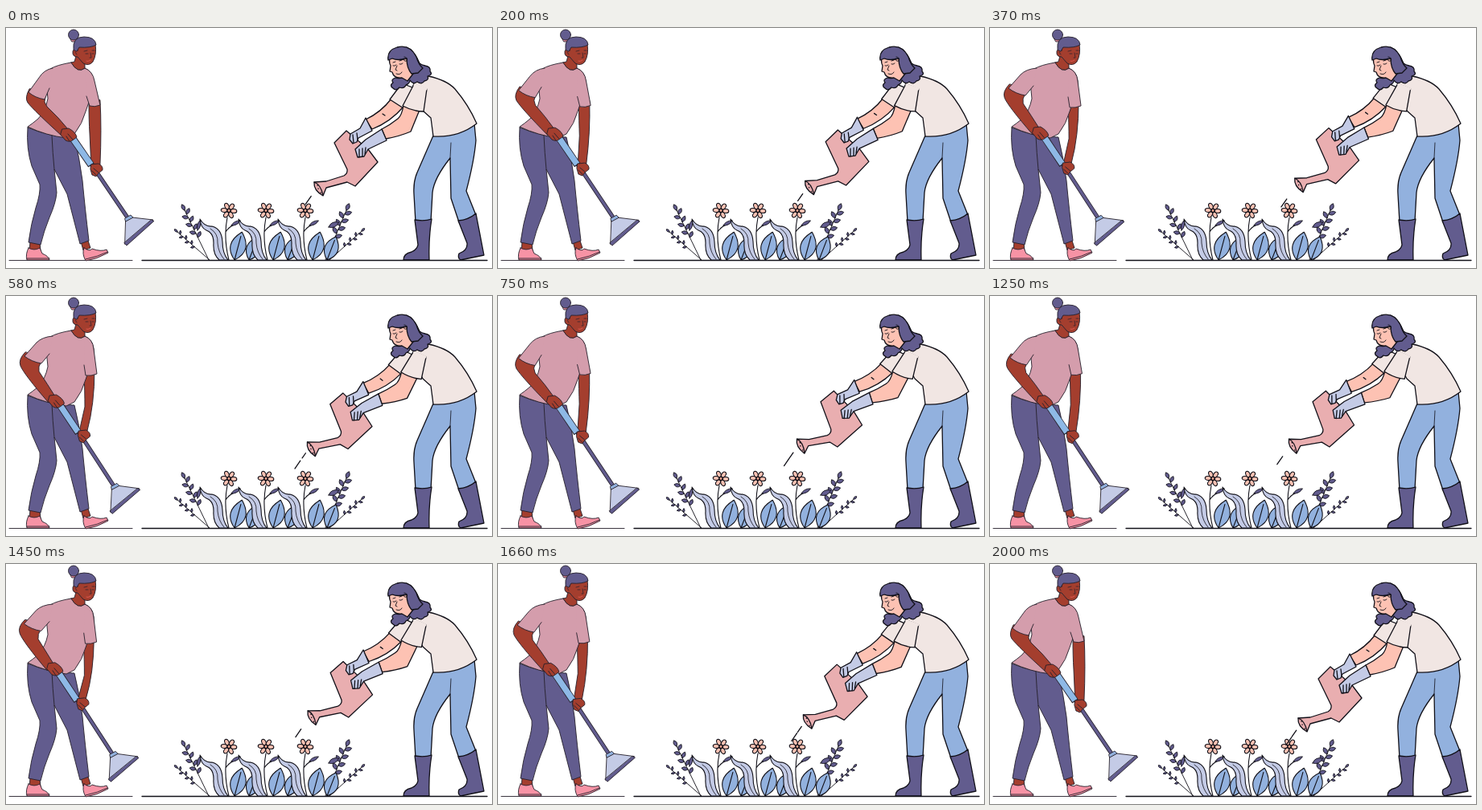
An HTML page for the animation above (2040 ms loop, 604 by 299 pixels).

```html
<!DOCTYPE html>
<html lang="en">
<head>
<meta charset="utf-8">
<title>Two gardeners</title>
<style>
html, body { margin: 0; width: 100%; height: 100%; overflow: hidden; background: #fff }
svg { display: block; width: 604px; height: 299px; stroke-linejoin: round; stroke-linecap: round }
.thin { stroke: #25202b; stroke-width: .9 }
.bold { stroke: #111018; stroke-width: 1.3 }
.skin { fill: #a43e2e } .peach { fill: #fdc2b3 } .rose { fill: #d49dac }
.navy { fill: #625c8e } .blue { fill: #92b1de } .glove { fill: #c4cbe6 }
.cream { fill: #f1e6e3 } .pink { fill: #f793a5 } .can { fill: #e9aeb0 }
.line { fill: none }
</style>
</head>
<body>
<svg viewBox="0 0 604 299">
<path class="line thin" d="M4 289.5H157"/>
<path class="line bold" d="M169 289.5H598"/>

<g id="garden" class="bold" style="stroke-width:1.1"></g>

<!-- sweeping woman -->
<g class="thin">
  <path class="skin" d="M30 266L29 278H43L42 266ZM93 266L96 277L105 274L102 265Z"/>
  <path class="pink" d="M28 274Q35 278 42 274L45 281Q53 284 54 289H26Q24 282 28 274ZM97 274Q104 279 107 275Q118 279 125 276L127 280Q113 288 99 290Q94 281 97 274Z"/>
  <path class="line" d="M26 287H54M99 288Q114 285 126 279"/>
  <path class="navy" d="M27 124Q25 150 32 172L42 195Q43 206 37 224Q31 244 28 267L43 270Q47 253 54 236Q62 218 63 205L60 176L76 207Q84 238 92 269L103 265Q98 223 95 190Q91 160 85 136Q55 136 27 124Z"/>
  <path class="line" d="M57 134Q58 156 60 176"/>
  <path class="skin" id="armR"/>
  <path class="rose" d="M81 43Q63 46 55 51L50 67L52 88Q49 103 40 113Q33 119 27 123Q50 134 75 137L85 132Q95 119 99 104L109 75Q111 55 98 50Q89 57 81 43Z"/>
  <path class="rose" id="sleeveR"/>
  <g id="rake">
    <path d="M105 168L151 236" stroke-width="5"/>
    <path d="M105 168L151 236" stroke="#625c8e" stroke-width="3.4"/>
    <path d="M80 133L106 171" stroke="#25202b" stroke-width="9" stroke-linecap="butt"/>
    <path d="M80.5 134L105.5 170" stroke="#8eb9e6" stroke-width="7.4" stroke-linecap="butt"/>
    <path class="glove" d="M149 240L157 236L183 239L148 269Z"/>
    <path class="blue" d="M148 237L155 233L158 236L149 241Z"/>
    <path class="navy" d="M181 239L184 240.5L150 271L147 268Z"/>
  </g>
  <path class="skin" id="armL"/>
  <path class="rose" id="sleeveL"/>
  <g id="hands">
    <path class="skin" d="M70 126L78 125Q87 130 88 136L84 139Q80 143 74 140L68 133Z"/>
    <path class="line" d="M77 132L83 139M75 135L79 141"/>
    <path class="skin" d="M106 170L115 169Q121 172 120 177L115 181L112 185L107 183L105 176Z"/>
    <path class="line" d="M109 175L115 180M107 178L112 183"/>
  </g>
  <path class="skin" d="M87 35L85 42L81 43Q89 57 98 50L98 44Z"/>
  <path class="skin" d="M88 22Q99 26 111 20Q113 33 108 42Q103 48 96 44L89 36Q82 36 83 29Q84 25 89 28Z"/>
  <path class="pink" d="M80 13H88L90 17H82Z"/>
  <circle class="navy" cx="84" cy="8.5" r="6.5"/>
  <path class="navy" d="M84 27Q82 11 97 11Q111 11 112 21Q105 25 91 24L88 29Z"/>
  <path class="line" d="M97 29L101 28M107 28L110 28M99 32L102 32M107 32L109 32M105 31L106 37L104 37M86 30L88 33" stroke-width=".7"/>
  <path d="M100 41Q102 42 105 40" fill="none" stroke="#d9544a" stroke-width="1.1"/>
</g>

<!-- watering woman -->
<g class="bold">
  <path class="blue" d="M531 134Q521 157 511 180Q506 191 507 207L509 242L528 241L530 205Q532 187 552 162L553 212L563 242L584 233L572 203Q582 165 584 140L582 119Z"/>
  <path class="line" d="M552 162L553 143" stroke-width=".8"/>
  <path class="navy" d="M508 239Q520 241 529 238Q525 262 526 289H494Q494 281 504 279Q511 276 512 270ZM562 240Q575 239 584 231L594 283L565 289Q561 287 563 281Q574 277 573 268Z"/>
  <g class="swing">
    <path class="peach" d="M447 114Q466 105 479 88L494 98Q478 117 455 126Z"/>
    <path class="cream" d="M492 69L477 89L494 100L510 76Z"/>
    <path class="can" d="M423 128L408 143L424 176Q425 181 420 184L398 191L383 192Q382 202 394 209L398 199L424 192L434 197L462 167L450 151Z"/>
    <path class="line" d="M383 192Q391 195 394 208M388 200L388.2 200.3M391 205L391.2 205.2M387 196L387.2 196.3"/>
    <path class="glove" d="M447 112L455 128L438 137L436 142L431 144L427 139L428 132L440 125Z"/>
    <path class="line" d="M431 133L432 143M436 131L437 139M468 107L471 109"/>
  </g>
  <path class="cream" d="M508 66Q515 59 525 60Q548 65 558 76Q575 96 585 119Q562 137 531 135L528 112L518 103L504 78Z"/>
  <g class="swing">
    <path class="peach" d="M494 96Q492 109 487 113Q477 121 467 126L472 138Q489 135 503 129L514 102Z"/>
    <path class="cream" d="M507 70L493 97Q506 104 519 104L523 76Z"/>
    <path d="M508 71L522 76" stroke="#f1e6e3" stroke-width="3"/>
    <path class="glove" d="M467 126L473 140L450 151L445 160L437 161L434 151L447 139Z"/>
    <path class="line" d="M439 151V161M443 150V160M447 149L446 157"/>
  </g>
  <path class="navy" d="M500 59Q491 64 484 62Q478 64 481 68Q476 72 481 75Q485 79 489 74Q495 76 497 71Q502 69 502 65Q506 71 511 67Q517 71 520 66Q526 65 524 60Q531 58 527 54Q528 48 521 47Q516 46 514 44Q508 29 498 24Z"/>
  <path class="peach" d="M478 31Q475 42 478 47L477 54L480 55Q482 63 492 62L499 66L506 57L500 34Z"/>
  <path class="navy" d="M475 40Q473 28 486 24Q502 20 510 36Q513 46 518 50L512 56L504 57Q498 50 498 38Q487 41 480 38Z"/>
  <path class="line" d="M481 47Q483 48 485 46M489 45Q491 46 493 44M481 43L484 42M489 41L492 40M485 57Q490 59 492 55M486 47L484 52L486 53M495 36Q500 37 498 41Q494 42 494 38" stroke-width=".9"/>
</g>
<path id="water" class="line bold"/>
</svg>
<script>
const $ = id => document.getElementById(id);

// Plants
let plants = '';
const draw = (cls, d, more = '') => plants += `<path class="${cls}" d="${d}" ${more}/>`;
const leaf = (x, y, angle, len, wide) =>
  draw('navy', `M0 0Q${len * .45} ${-wide} ${len} 0Q${len * .45} ${wide} 0 0Z`,
    `transform="translate(${x} ${y}) rotate(${angle})" stroke-width=".8"`);

// Leaves alternate along the upper part of a stem
function sprig(x, y, tipX, tipY, count, len) {
  const angle = Math.atan2(tipY - y, tipX - x) * 180 / Math.PI;
  draw('line', `M${x} ${y}L${tipX} ${tipY}`, 'stroke-width=".9"');
  for (let i = 0; i < count; i++) {
    const k = 1 - i * .62 / count, turn = i ? (i % 2 ? 52 : -52) : 0;
    leaf(x + (tipX - x) * k, y + (tipY - y) * k, angle + turn, len, len * .55);
  }
}

function flower(x, y) {
  for (let i = 0; i < 6; i++)
    plants += `<ellipse class="peach" cx="6" rx="3.8" ry="2.5" transform="translate(${x} ${y}) rotate(${i * 60 + 5})"/>`;
  plants += `<circle cx="${x}" cy="${y}" r="2" fill="#f3a58f"/>`;
}

function blade(x, y, w, tilt) {
  const h = 289 - y;
  draw('blue', `M0 0Q${-w} ${-h * .45} 0 ${-h}Q${w} ${-h * .45} 0 0ZM0 0V${-h * .85}`,
    `transform="translate(${x} 289) rotate(${tilt})"`);
}

sprig(252, 289, 222, 227, 8, 8);
sprig(253, 289, 213, 254, 7, 5);
sprig(397, 289, 423, 227, 8, 9);
sprig(402, 289, 442, 253, 7, 5);
leaf(238, 252, -75, 13, 4);
leaf(401, 248, -25, 14, 6);
for (const dx of [0, 48, 97]) {
  draw('line', `M${275 + dx} 236Q${270 + dx} 262 ${277 + dx} 289M${273 + dx} 254Q${277 + dx} 248 ${282 + dx} 246`);
  leaf(280 + dx, 246, -28, 13, 4);
  draw('glove', `M${241 + dx} 238Q${247 + dx} 248 ${256 + dx} 247Q${268 + dx} 250 ${269 + dx} 266Q${269 + dx} 281 ${276 + dx} 289H${265 + dx}Q${257 + dx} 282 ${258 + dx} 268Q${258 + dx} 255 ${249 + dx} 252Q${242 + dx} 249 ${241 + dx} 238Z`);
  draw('line', `M${254 + dx} 250Q${264 + dx} 256 ${263 + dx} 268Q${264 + dx} 280 ${271 + dx} 288`, 'stroke-width=".8"');
  blade(284 + dx, 253, 19, 15);
  blade(302 + dx, 258, 17, 21);
  flower(277 + dx - (dx ? 2 : 0), 227.5);
}
$('garden').innerHTML = plants;

// Arm poses: near and far end of each sweep
const poses = {
  armL: ['M29 76Q23 87 27 93Q35 103 69 134L77 126Q66 112 51 98L48 92L50 80Z',
         'M24 70Q15 79 18 87Q22 97 53 133L61 125Q51 109 41 94L41 88L46 77Z'],
  armR: ['M103 92Q103 115 104 131L106 173L117 171Q119 125 117 90Z',
         'M97 94Q98 120 98 138L91 169L101 168Q110 135 110 92Z'],
  sleeveL: ['M58 50Q47 52 41 62L28 80Q36 87 48 89L54 75',
            'M58 50Q45 51 38 58L23 75Q32 82 44 84L54 72'],
  sleeveR: ['M98 50Q108 54 110 66L117 96Q110 99 104 97L100 85',
            'M98 50Q108 54 109 66L113 97Q106 100 99 99L97 86'],
};
const mix = (a, b, k) => {
  const ends = b.match(/[\d.]+/g);
  let i = 0;
  return a.replace(/[\d.]+/g, v => +v + (ends[i++] - v) * k);
};

const LOOP = 2040, TAU = Math.PI * 2, PIVOT = [524, 63];
const births = [130, 385, 550, 664, 866, 1082, 1260, 1474, 1617, 1795, 1945];
const swings = document.querySelectorAll('.swing');

function water(t, angle) {
  const a = angle * Math.PI / 180, rx = -141, ry = 141;
  const x = PIVOT[0] + rx * Math.cos(a) - ry * Math.sin(a);
  const y = PIVOT[1] + rx * Math.sin(a) + ry * Math.cos(a);
  const at = d => `${x - .57 * d} ${y + .82 * d}`;
  return births.map(b => (t - b + LOOP) % LOOP).filter(age => age < 242)
    .map(age => `M${at(age * .07)}L${at(age * .07 + Math.min(12, 5 + age * .08))}`).join('');
}

const start = performance.now();
function frame() {
  const t = (performance.now() - start) % LOOP;
  const sweep = (1 - Math.cos(TAU * (t + 20) / 1000)) / 1.8;
  const angle = 3.15 * (1 - Math.cos(TAU * t / 2000));
  for (const id in poses) $(id).setAttribute('d', mix(...poses[id], sweep));
  $('rake').setAttribute('transform', `translate(${-16 * sweep} ${-.5 * sweep}) rotate(${sweep} 106 170)`);
  $('hands').setAttribute('transform', `translate(${-15.5 * sweep} ${-2 * sweep})`);
  swings.forEach(g => g.setAttribute('transform', `rotate(${angle} ${PIVOT})`));
  $('water').setAttribute('d', water(t, angle));
  requestAnimationFrame(frame);
}
frame();
</script>
</body>
</html>
```
